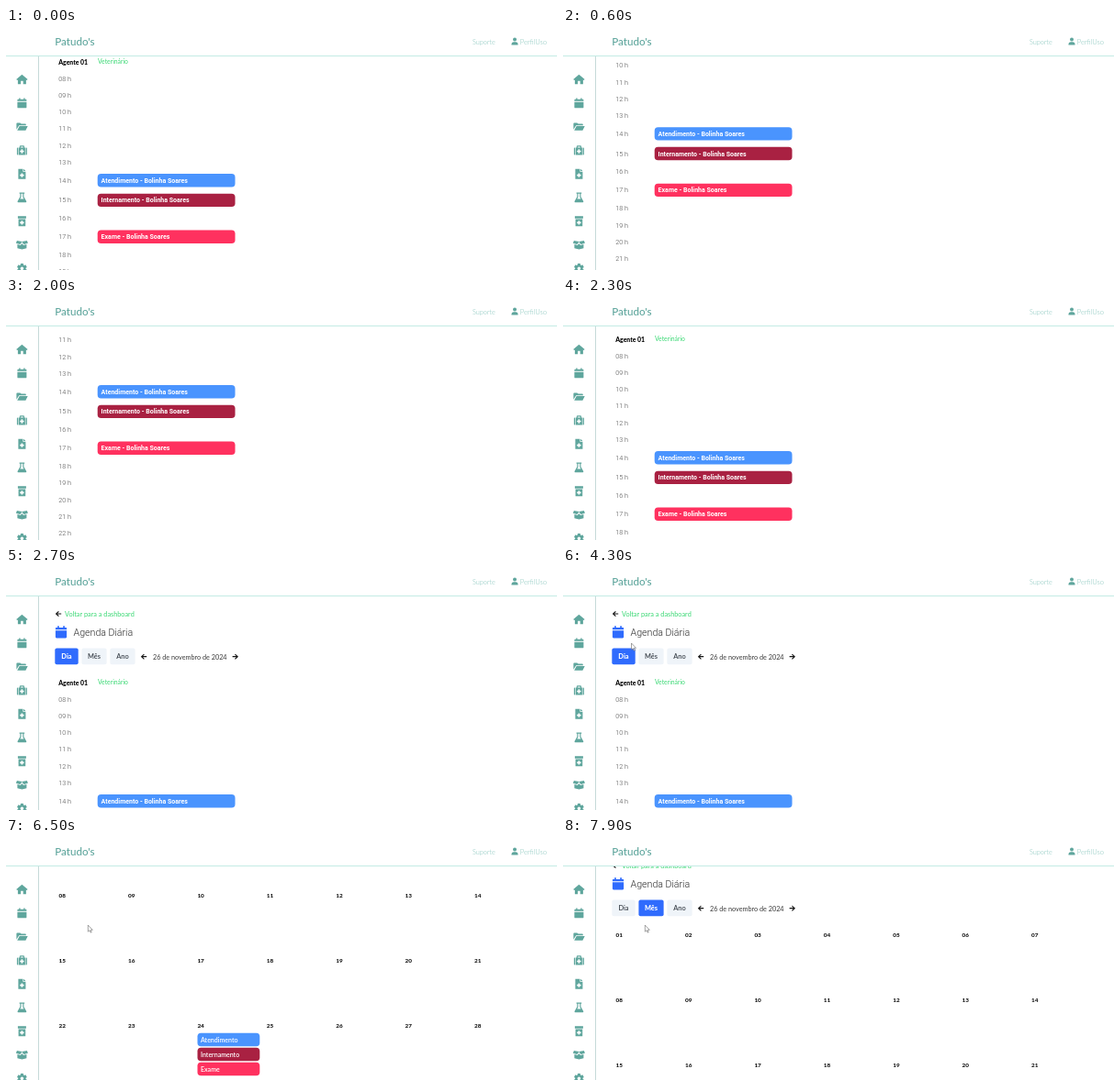
Write an HTML page with a canvas that moves like this. It is 600 by 264 pixels and loops after 8000 ms.

```html
<!DOCTYPE html>
<html lang="pt-BR">
<head>
<meta charset="utf-8">
<title>Agenda</title>
<style>
html, body { margin: 0; width: 100%; height: 100%; overflow: hidden; background: #fff; }
canvas { display: block; width: 600px; height: 264px; }
</style>
</head>
<body>
<canvas id="stage"></canvas>
<script>
const W = 600, H = 264, LOOP = 8000, STEP = 100;
const MONTH_AT = 4600;
const TEAL = '#5fa69d', PALE = '#80c2b9', BLUE = '#2f6bfd', GREEN = '#3ad874', INK = '#151515';
const LATO = 'Lato, sans-serif', ROBOTO = 'Roboto, sans-serif';

const canvas = document.getElementById('stage');
const ctx = canvas.getContext('2d');
const ratio = window.devicePixelRatio || 1;
canvas.width = W * ratio;
canvas.height = H * ratio;

// [time, value...]; linear between neighbours
const scrollKeys = [
  [0, 88], [100, 92], [300, 112], [600, 138.9], [900, 155], [1000, 158], [1900, 158],
  [2000, 152], [2100, 133], [2500, 27], [2600, 8], [2700, 0], [6300, 0],
  [6400, 127], [6500, 133.6], [6800, 133.6], [6900, 205], [7000, 218],
  [7100, 221], [7800, 221], [7900, 20]
];
const cursorKeys = [
  [3700, 191, 1], [3900, 141, 40], [4100, 95, 68], [4300, 74.5, 82],
  [4400, 81, 89], [4500, 89.3, 95]
];

const events = [
  { hour: 14, name: 'Atendimento', color: '#4a94fe' },
  { hour: 15, name: 'Internamento', color: '#a92142' },
  { hour: 17, name: 'Exame', color: '#ff315f' }
];
const PATIENT = 'Bolinha Soares';

const cross = y =>
  `M-.8 ${y - 2.2}h1.6v1.4h1.4v1.6h-1.4v1.4h-1.6v-1.4h-1.4v-1.6h1.4z`;

const icons = {
  house: 'M0-5.6L6.2-.2L5.2.8L4.5.3V5H1.3V1.5H-1.3V5H-4.5V.3L-5.2.8L-6.2-.2Z',
  calendar: 'M-5-3.6Q-5-4.2-4.4-4.2H-3.2V-5.5H-1.8V-4.2H1.8V-5.5H3.2V-4.2H4.4Q5-4.2 5-3.6V-2.2H-5Z' +
    'M-5-1.4H5V4.4Q5 5.3 4.1 5.3H-4.1Q-5 5.3-5 4.4Z',
  folder: 'M-6 3V-3.6Q-6-4.4-5.2-4.4H-2L-.8-3.2H3.6Q4.4-3.2 4.4-2.4V-1.6H-3.2ZM-2.7-.8H6.3L4 4H-5.2Z',
  kit: 'M-5.5-2.2Q-5.5-3-4.7-3H-2.6V-4.2Q-2.6-5.2-1.6-5.2H1.6Q2.6-5.2 2.6-4.2V-3H4.7Q5.5-3 5.5-2.2V4.2Q5.5 5 4.7 5H-4.7Q-5.5 5-5.5 4.2Z' +
    'M-1.5-3V-4.1H1.5V-3ZM-4.1-3V5H-3.5V-3ZM3.5-3V5H4.1V-3Z' + cross(1),
  file: 'M-4-5.5H1V-2.5H4V5.5H-4ZM1.7-5.5L4-3.2H1.7Z' + cross(1.3),
  flask: 'M-2.8-5.5H2.8V-4.2H2V-1L4.8 4Q5.2 5.3 4 5.3H-4Q-5.2 5.3-4.8 4L-2-1V-4.2H-2.8ZM-.9-4.2V-.7L-2 1.4H2L.9-.7V-4.2Z',
  bottle: 'M-4.5-5.5H4.5V-3H-4.5ZM-3.8-2.3H3.8V5.5H-3.8Z' + cross(1.6),
  box: 'M-5.5-4.5L0-3.6L5.5-4.5L6.5-1.8L2-.5L0-3.4L-2-.5L-6.5-1.8ZM-5-.5L-1.6.5L0-1.6L1.6.5L5-.5V3.6L0 5L-5 3.6Z',
  user: 'M-2-2A2 2 0 0 1 2-2A2 2 0 0 1-2-2ZM-3.6 3.8Q-3.6.6-.9.6H.9Q3.6.6 3.6 3.8Z',
  arrow: 'M-3.2 0L0-3L.8-2.2L-1 -.6H3.2V.6H-1L.8 2.2L0 3Z',
  pointer: 'M0 0V7.2L1.7 5.7L2.8 8.2L3.9 7.7L2.8 5.3H5Z',
  hand: 'M1.2.6Q2-.2 2.7.6V3L5.8 3.7Q6.6 4 6.5 4.9L5.9 8.4H2.2L-.2 5.4Q-.2 4.4 1.2 5Z'
};
for (const key in icons) icons[key] = new Path2D(icons[key]);
const sidebar = ['house', 'calendar', 'folder', 'kit', 'file', 'flask', 'bottle', 'box'];

function at(keys, t) {
  let i = keys.length - 1;
  while (i > 0 && keys[i][0] > t) i--;
  const a = keys[i], b = keys[i + 1];
  if (!b) return a.slice(1);
  const k = (t - a[0]) / (b[0] - a[0]);
  return a.slice(1).map((v, n) => v + (b[n + 1] - v) * k);
}

// y is the middle of the capitals
function text(str, x, y, size, color, weight = 400, family = LATO, align = 'left') {
  ctx.font = `${weight} ${size}px ${family}`;
  ctx.textAlign = align;
  ctx.fillStyle = color;
  ctx.fillText(str, x, y + size * 0.36);
}

function rounded(x, y, w, h, r, color) {
  ctx.fillStyle = color;
  ctx.beginPath();
  ctx.roundRect(x, y, w, h, r);
  ctx.fill();
}

function icon(name, x, y, color, sx = 1, sy = Math.abs(sx)) {
  ctx.save();
  ctx.translate(x, y);
  ctx.scale(sx, sy);
  ctx.fillStyle = color;
  ctx.fill(icons[name], 'evenodd');
  ctx.restore();
}

function gear(x, y) {
  ctx.save();
  ctx.translate(x, y);
  ctx.fillStyle = TEAL;
  for (let i = 0; i < 3; i++) {
    ctx.fillRect(-1.5, -5.4, 3, 10.8);
    ctx.rotate(Math.PI / 3);
  }
  ctx.beginPath();
  ctx.arc(0, 0, 4.1, 0, 7);
  ctx.fill();
  ctx.fillStyle = '#fff';
  ctx.beginPath();
  ctx.arc(0, 0, 1.8, 0, 7);
  ctx.fill();
  ctx.restore();
}

function tab(label, x, w, active) {
  rounded(x, 87.4, w, 17.9, 2, active ? BLUE : '#eff4f9');
  text(label, x + w / 2, 96.7, 7.4, active ? '#fff' : '#3d444c', active ? 800 : 600, LATO, 'center');
}

function toolbar(month) {
  icon('arrow', 57, 50, INK);
  text('Voltar para a dashboard', 64, 50.3, 7.3, GREEN);
  icon('calendar', 60, 70, BLUE, 1.22);
  text('Agenda Diária', 73.6, 70, 10.6, '#2b2b2b', 300, ROBOTO);
  tab('Dia', 53.3, 25.4, !month);
  tab('Mês', 82.4, 27.2, month);
  tab('Ano', 113.4, 27.2, false);
  icon('arrow', 150, 96.7, INK);
  text('26 de novembro de 2024', 160, 96.9, 7.25, '#3a3a3a');
  icon('arrow', 249.8, 96.7, INK, -1);
}

function dayView() {
  text('Agente 01', 57.2, 125.3, 6.9, '#000', 800);
  text('Veterinário', 100, 125, 6.8, GREEN);
  let top = 134;
  for (let hour = 8; hour <= 22; hour++) {
    const event = events.find(e => e.hour === hour);
    const height = event ? 21.6 : 18.25;
    const mid = top + height / 2;
    text(String(hour).padStart(2, '0') + ' h', 57.3, mid, 7.15, '#4c4c4c', 300, ROBOTO);
    if (event) {
      rounded(99.7, mid - 7.2, 149.8, 14.4, 3.8, event.color);
      text(`${event.name} - ${PATIENT}`, 103.6, mid, 7.03, '#fff', 700, ROBOTO);
    }
    top += height;
  }
}

function monthView() {
  for (let day = 1; day <= 30; day++) {
    const x = 57.6 + (day - 1) % 7 * 75.4;
    const y = 125.2 + Math.floor((day - 1) / 7) * 71;
    text(String(day).padStart(2, '0'), x, y, 6.4, '#111', 800);
    if (day !== 24) continue;
    events.forEach((e, i) => {
      const top = y + 8.2 + i * 16;
      rounded(x + 0.1, top, 67.8, 14.4, 3.8, e.color);
      text(e.name, x + 3.6, top + 7.3, 7.03, '#fff', 600);
    });
  }
}

function frame() {
  ctx.fillStyle = '#fff';
  ctx.fillRect(0, 0, W, 31);
  ctx.fillStyle = '#c3ebe4';
  ctx.fillRect(0, 30, W, 1);
  ctx.fillStyle = '#c6dad8';
  ctx.fillRect(35, 31, 1, H);
  text("Patudo's", 53.2, 15, 11.6, TEAL, 500);
  text('Suporte', 508, 15.2, 7.3, PALE, 300);
  icon('user', 554, 14.6, TEAL);
  text('PerfilUso', 559.8, 15.2, 7.6, PALE, 300);
  sidebar.forEach((name, i) => icon(name, 17.4, 56.3 + i * 25.75, TEAL));
  gear(17.4, 262.3);
}

function cursor(t) {
  if (t < cursorKeys[0][0]) return;
  const [x, y] = at(cursorKeys, t);
  const shape = icons[t >= 4500 && t < 6400 ? 'hand' : 'pointer'];
  ctx.save();
  ctx.translate(x, y);
  ctx.fillStyle = '#fff';
  ctx.strokeStyle = '#666';
  ctx.lineWidth = 0.6;
  ctx.fill(shape);
  ctx.stroke(shape);
  ctx.restore();
}

function draw(now) {
  const t = Math.floor(now % LOOP / STEP) * STEP;
  const month = t >= MONTH_AT;
  ctx.setTransform(ratio, 0, 0, ratio, 0, 0);
  ctx.fillStyle = '#fff';
  ctx.fillRect(0, 0, W, H);
  ctx.save();
  ctx.translate(0, -at(scrollKeys, t)[0]);
  toolbar(month);
  (month ? monthView : dayView)();
  ctx.restore();
  frame();
  cursor(t);
}

const start = performance.now();
function tick() {
  draw(performance.now() - start);
  requestAnimationFrame(tick);
}
tick();
</script>
</body>
</html>
```
